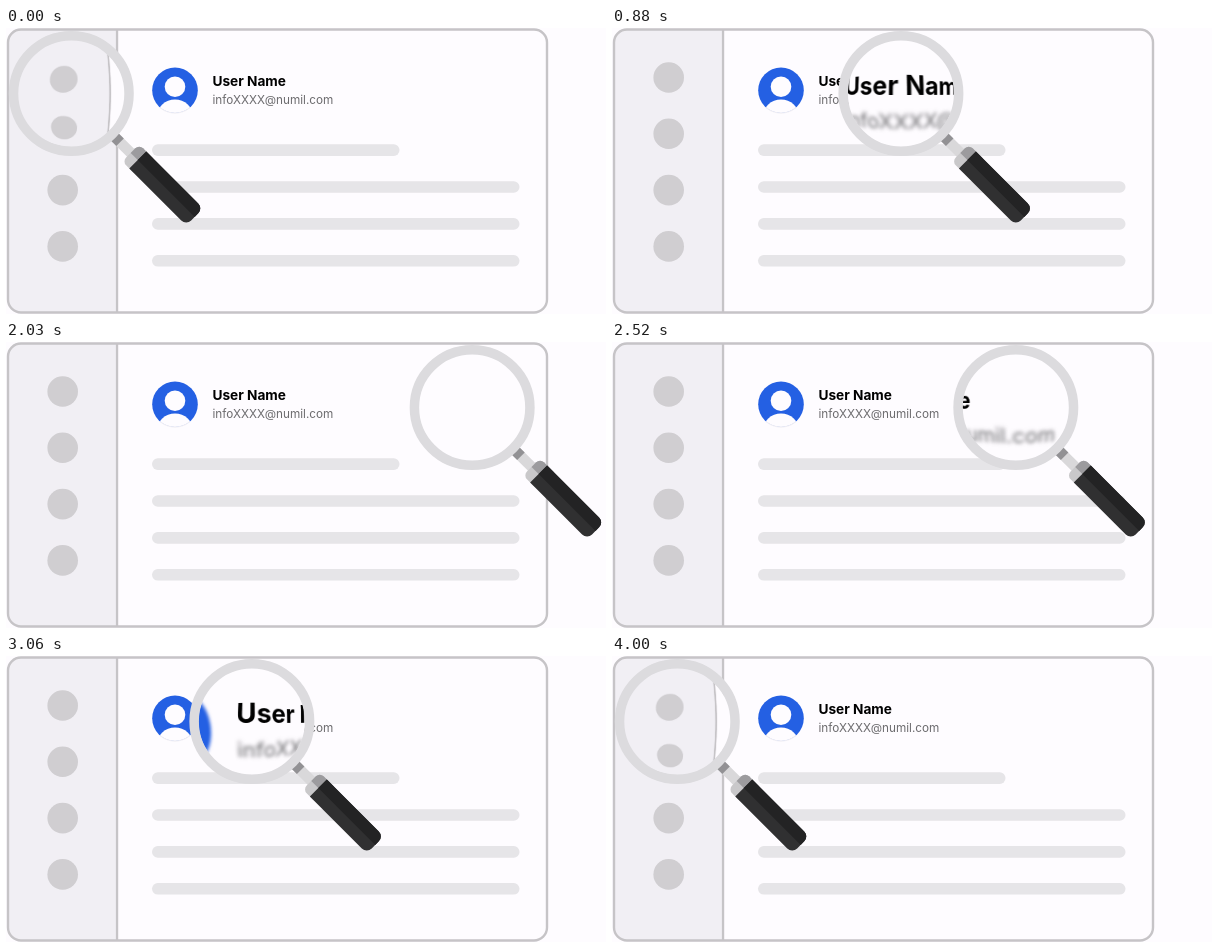
Animation, 600 px wide and 286 px high, one loop 5.03 s. Source, as an HTML page with a canvas:

```html
<!DOCTYPE html>
<html lang="en">
<head>
<meta charset="utf-8">
<title>Profile search</title>
<style>
  html, body { margin: 0; width: 100%; height: 100%; overflow: hidden; background: #fefcff; }
  canvas { display: block; width: 600px; height: 286px; }
</style>
</head>
<body>
<canvas id="stage"></canvas>
<script>
const W = 600, H = 286, LOOP = 5030, HALF = 2000;
const PAPER = '#fefcff', SIDE = '#f1eff4', EDGE = '#c6c4c7', DOT = '#d0ced1', BAR = '#e6e5e8';
const CY = 65.5, LENS_R = 53.5, BEND = 0.0045, ZOOM = 2.17;
const NAME_X = 206.5;

const dpr = window.devicePixelRatio || 1;

function layer(canvas, w, h) {
  canvas.width = Math.round(w * dpr);
  canvas.height = Math.round(h * dpr);
  const c = canvas.getContext('2d');
  c.scale(dpr, dpr);
  return c;
}

const g = layer(document.getElementById('stage'), W, H);
const base = document.createElement('canvas');
const scene = document.createElement('canvas');
const big = document.createElement('canvas');
const bg = layer(base, W, H);
const sg = layer(scene, W, 140);
const zg = layer(big, 440, 150);

function disc(c, x, y, r, fill) {
  c.fillStyle = fill;
  c.beginPath();
  c.arc(x, y, r, 0, 2 * Math.PI);
  c.fill();
}

function box(c, x, y, w, h, r, fill) {
  c.fillStyle = fill;
  c.beginPath();
  c.roundRect(x, y, w, h, r);
  c.fill();
}

function text(c, str, y, font, fill) {
  c.font = font;
  c.fillStyle = fill;
  c.fillText(str, NAME_X, y);
}

function avatar(c) {
  c.save();
  disc(c, 169, 62.3, 22.8, '#2460e3');
  c.clip();
  disc(c, 169, 58.8, 10.3, PAPER);
  c.beginPath();
  c.ellipse(169, 88.5, 18, 17, 0, 0, 2 * Math.PI);
  c.fill();
  c.restore();
  c.strokeStyle = '#f1eff4';
  c.lineWidth = 1.2;
  c.beginPath();
  c.arc(169, 62.3, 22.8, 0.28 * Math.PI, 0.72 * Math.PI);
  c.stroke();
}

const userName = c => text(c, 'User Name', 57.6, '700 13.65px Inter, "Open Sans", sans-serif', '#000');
const email = c => text(c, 'infoXXXX@numil.com', 76, '400 11.75px Inter, "Open Sans", sans-serif', '#6c6b6e');

function sidebar(c) {
  c.fillStyle = SIDE;
  c.fillRect(0, 0, 111, H);
  c.fillStyle = EDGE;
  c.fillRect(109.9, 0, 2.3, H);
  for (let i = 0; i < 4; i++) disc(c, 56.7, 49.5 + i * 56.3, 15.3, DOT);
}

function paintBase() {
  const card = new Path2D();
  card.roundRect(2, 1.5, 539, 283, 13);
  bg.fillStyle = PAPER;
  bg.fillRect(0, 0, W, H);
  bg.save();
  bg.clip(card);
  sidebar(bg);
  bg.restore();
  bg.strokeStyle = EDGE;
  bg.lineWidth = 2.4;
  bg.stroke(card);
  for (let i = 0; i < 4; i++) box(bg, 146, 116.3 + i * 36.9, i ? 367.5 : 247.5, 11.6, 5.8, BAR);
  avatar(bg);
  userName(bg);
  email(bg);
}

// Enlarged profile: sharp name, soft picture and address.
const BIG_X = 150, BIG_Y = 57.7;
function paintBig() {
  const soft = (blur, draw) => {
    zg.filter = blur ? `blur(${blur * dpr}px)` : 'none';
    draw(zg);
  };
  zg.translate(BIG_X - NAME_X * ZOOM, -BIG_Y);
  zg.scale(ZOOM, ZOOM);
  soft(2, avatar);
  soft(2.6, email);
  soft(0, userName);
}

function bezier(x1, y1, x2, y2) {
  const at = (a, b, s) => 3 * (1 - s) * (1 - s) * s * a + 3 * (1 - s) * s * s * b + s * s * s;
  return x => {
    let lo = 0, hi = 1;
    for (let i = 0; i < 24; i++) {
      const mid = (lo + hi) / 2;
      if (at(x1, x2, mid) < x) lo = mid; else hi = mid;
    }
    return at(y1, y2, lo);
  };
}
const easeOut = bezier(1 / 6, 1 / 6, 2 / 3, 1);
const easeBoth = bezier(1 / 3, 0, 2 / 3, 1);

// Share of the way to the right; the motion runs at 30 steps per second.
function travel(t) {
  const ms = Math.min(2 * HALF, Math.floor((t + 11.5) * 0.03) / 0.03);
  return ms < HALF ? easeOut(ms / HALF) : 1 - easeBoth((ms - HALF) / HALF);
}

function lensView(cx, k) {
  sg.fillStyle = PAPER;
  sg.fillRect(0, 0, W, 140);
  sidebar(sg);
  // The enlarged profile drifts against the lens and is gone at the far end.
  sg.globalAlpha = Math.max(0, Math.min(1, (0.99 - k) * 10));
  sg.drawImage(big, 290.5 - 0.25 * cx - BIG_X, 0, 440, 150);
  sg.globalAlpha = 1;

  // Concentric discs, each shrunk a little less towards the middle.
  for (let r = LENS_R; r > 0.5; r -= 1) {
    const s = 1 / (1 + BEND * r);
    g.save();
    g.beginPath();
    g.arc(cx, CY, r, 0, 2 * Math.PI);
    g.clip();
    g.translate(cx, CY);
    g.scale(s, s);
    g.drawImage(scene, -cx, -CY, W, 140);
    g.restore();
  }
}

function magnifier(cx) {
  g.save();
  g.translate(cx, CY);
  g.rotate(Math.PI / 4);
  box(g, 60, -5.3, 25, 10.6, 0, '#d9d8da');
  box(g, 60, -5.3, 9, 10.6, 0, '#929194');
  box(g, 84, -12, 20, 24, 5.5, '#c9c8ca');
  box(g, 84, -12, 20, 12, [5.5, 0, 0, 0], '#9c9b9e');
  box(g, 94, -12, 80.5, 24, [0, 7, 7, 0], '#303031');
  box(g, 94, -12, 80.5, 12, [0, 7, 0, 0], '#232324');
  g.strokeStyle = '#dcdbde';
  g.lineWidth = 9.5;
  g.beginPath();
  g.arc(0, 0, 57.75, 0, 2 * Math.PI);
  g.stroke();
  g.restore();
}

function render(t) {
  const k = travel(t), cx = 65.3 + 401.2 * k;
  g.drawImage(base, 0, 0, W, H);
  lensView(cx, k);
  magnifier(cx);
}

paintBase();
paintBig();

const start = performance.now();
function tick() {
  render((performance.now() - start) % LOOP);
  requestAnimationFrame(tick);
}
tick();
</script>
</body>
</html>
```
